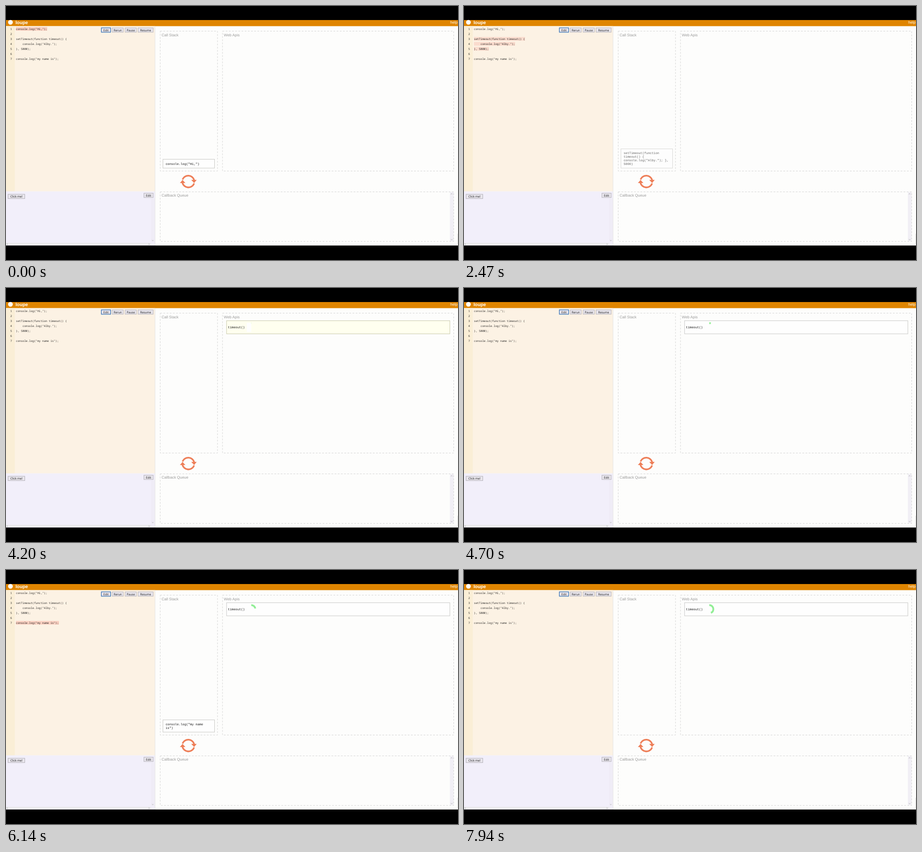
Write an HTML page that moves like this. It is 998 px wide and 561 px high and loops after 8000 ms.

```html
<!DOCTYPE html>
<html lang="en">
<head>
<meta charset="utf-8">
<title>loupe</title>
<style>
  html, body { margin: 0; width: 100%; height: 100%; overflow: hidden; background: #000; }
  svg { display: block; width: 100%; height: 100%; }
  text { text-rendering: geometricPrecision; white-space: pre; }
  .code { font: 6.05px "Noto Sans Mono", monospace; fill: #2b2a28; }
  .call { font: 6.9px "Liberation Mono", monospace; fill: #111; }
  .title { font: 8.3px "Liberation Sans", Arial, sans-serif; fill: #999; }
  .btn { font: 6.4px "Open Sans", sans-serif; fill: #111; text-anchor: middle; }
  .dash { fill: none; stroke: #d3d3d3; stroke-dasharray: 4 3; }
  .card { fill: #fefefe; stroke: #c6c6c2; }
  .mark { fill: #fad0c1; }
  .arrow { fill: none; stroke: #aaa; stroke-width: .9; }
</style>
</head>
<body>
<svg id="stage" viewBox="0 0 998 561">
  <rect y="31" width="998" height="498" fill="#fdfdfc"/>
  <rect y="31" width="998" height="13.5" fill="#df8500"/>
  <circle cx="9.8" cy="36" r="5.2" fill="#fff"/>
  <text x="21" y="39.8" fill="#fff" style="font:bold 10.3px 'Liberation Sans',Arial,sans-serif">loupe</text>
  <text x="981" y="38.6" fill="#fff" style="font:8.4px 'Liberation Sans',Arial,sans-serif">help</text>

  <rect y="44.5" width="329" height="365" fill="#fcf2e4"/>
  <rect y="44.5" width="19.5" height="365" fill="#faeed6"/>
  <rect y="409.5" width="329" height="119.5" fill="#f2effa"/>
  <rect x="320.5" y="425" width="7" height="97" fill="#efecf6"/>
  <rect y="523" width="320" height="5.5" fill="#ecebee"/>
  <path d="M329 44.5V529" stroke="#e4e2e2"/>
  <path class="arrow" d="M322.3 517l1.7 1.7 1.7-1.7M3.5 524.3l-1.7 1.7 1.7 1.7M315 524.3l1.7 1.7-1.7 1.7"/>

  <rect class="dash" x="340.5" y="55.5" width="126.5" height="309"/>
  <rect class="dash" x="478" y="55.5" width="510.5" height="309"/>
  <rect x="980" y="411" width="8" height="108.5" fill="#f1eff5"/>
  <rect class="dash" x="340.5" y="410.5" width="648" height="109.5"/>
  <path class="arrow" d="M982 416l1.9-1.9 1.9 1.9M982 514.8l1.9 1.9 1.9-1.9"/>
  <path d="M997.3 503v25" stroke="#ddd"/>
  <text class="title" x="343.5" y="66.5">Call Stack</text>
  <text class="title" x="481" y="66.5">Web Apis</text>
  <text class="title" x="343.5" y="420.6">Callback Queue</text>

  <g fill="none" stroke="#ee7f59" stroke-width="3.6">
    <path d="M389.8 383.2A13.6 13.6 0 0 1 415.6 385"/>
    <path d="M415.4 391.8A13.6 13.6 0 0 1 389.4 390"/>
    <path d="M409 384h12l-5.6 7zM384 391h12l-6.2-7z" fill="#ee7f59" stroke="none"/>
  </g>
</svg>
<script>
const LOOP = 8000;
const FADE = 200;
const stage = document.getElementById('stage');

function add(parent, tag, attrs, text) {
  const el = document.createElementNS('http://www.w3.org/2000/svg', tag);
  for (const k in attrs) el.setAttribute(k, attrs[k]);
  if (text) el.textContent = text;
  parent.append(el);
  return el;
}

// steps: [ms, value] pairs covering the whole loop
function play(el, prop, steps) {
  el.animate(steps.map(([ms, v]) => ({ offset: ms / LOOP, [prop]: v })),
    { duration: LOOP, iterations: Infinity });
}

function show(el, from, to) {
  const steps = from ? [[0, 0], [from, 0], [from + FADE, 1]] : [[0, 1]];
  if (to < LOOP) steps.push([to, 1], [to + FADE, 0], [LOOP, 0]);
  else steps.push([LOOP, 1]);
  play(el, 'opacity', steps);
}

const rowY = n => 52.6 + 11 * (n - 1);

// highlighted rows: [row, right edge]; the stack card grows upwards
const calls = [
  { from: 0, to: 840, top: 338.5, rows: [[1, 91]],
    lines: ['console.log("Hi,")'] },
  { from: 2340, to: 3840, top: 315.5, rows: [[3, 135], [4, 113], [5, 55]],
    lines: ['setTimeout(function', 'timeout() {', 'console.log("Alby"); },'.replace('"Alby"', '"Alby."'), '5000)'] },
  { from: 5340, to: 6840, top: 331, rows: [[7, 117]],
    lines: ['console.log("my name', 'is")'] }
];

for (const { from, to, top, rows, lines } of calls) {
  const g = add(stage, 'g', {});
  for (const [row, right] of rows)
    add(g, 'rect', { class: 'mark', x: 22, y: rowY(row) - 6.1, width: right - 22, height: 8 });
  add(g, 'rect', { class: 'card', x: 346.5, y: top, width: 114, height: 358 - top });
  lines.forEach((line, i) =>
    add(g, 'text', { class: 'call', x: 352.4, y: 350.8 - 7.9 * (lines.length - 1 - i) }, line));
  show(g, from, to);
}

const source = [
  'console.log("Hi,");', '', 'setTimeout(function timeout() {',
  '    console.log("Alby.");', '}, 5000);', '', 'console.log("my name is");'
];
source.forEach((line, i) => {
  const y = rowY(i + 1);
  add(stage, 'text', { class: 'code', x: 9.4, y }, String(i + 1));
  const code = line.trimStart();
  const indent = line.length - code.length;
  if (code) add(stage, 'text', { class: 'code', x: 22 + indent * 3.63, y }, code);
});

function button(x, y, w, label, focused) {
  add(stage, 'rect', { x, y, width: w, height: 9.6, fill: '#e8e5ec',
    stroke: focused ? '#2f6eb5' : '#b3b1b8', 'stroke-width': focused ? 1.3 : 1 });
  add(stage, 'text', { class: 'btn', x: x + w / 2, y: y + 7.2 }, label);
}
button(210.5, 48.3, 20.5, 'Edit', true);
button(234.5, 48.3, 24.5, 'Rerun');
button(263, 48.3, 25, 'Pause');
button(291.5, 48.3, 33.5, 'Resume');
button(304.5, 413.4, 20.5, 'Edit');
button(4.5, 415.8, 37, 'Click me!');

// pending timer with its progress ring
const timer = add(stage, 'g', {});
const box = add(timer, 'rect', { class: 'card', x: 487, y: 72.2, width: 493, height: 29 });
add(timer, 'rect', { x: 531.5, y: 77, width: 10, height: 20, fill: '#fefefe' });
add(timer, 'text', { class: 'call', x: 490, y: 88.8 }, 'timeout()');
const ring = add(timer, 'path', {
  d: 'M541.5 77.5a9 9 0 0 1 0 18a9 9 0 0 1 0-18', pathLength: 360, fill: 'none',
  stroke: '#92ee96', 'stroke-width': 4, 'stroke-dasharray': '360 400'
});
show(timer, 3840, LOOP);
play(box, 'fill', [[0, '#ffffe2'], [3840, '#ffffe2'], [4640, '#fefefe'], [LOOP, '#fefefe']]);
play(box, 'stroke', [[0, '#c6c68c'], [3840, '#c6c68c'], [4640, '#c6c6c4'], [LOOP, '#c6c6c4']]);
play(ring, 'strokeDashoffset',
  [[0, 360], [4170, 360], [5370, 311], [6140, 280], [LOOP, 202]]);
</script>
</body>
</html>
```
